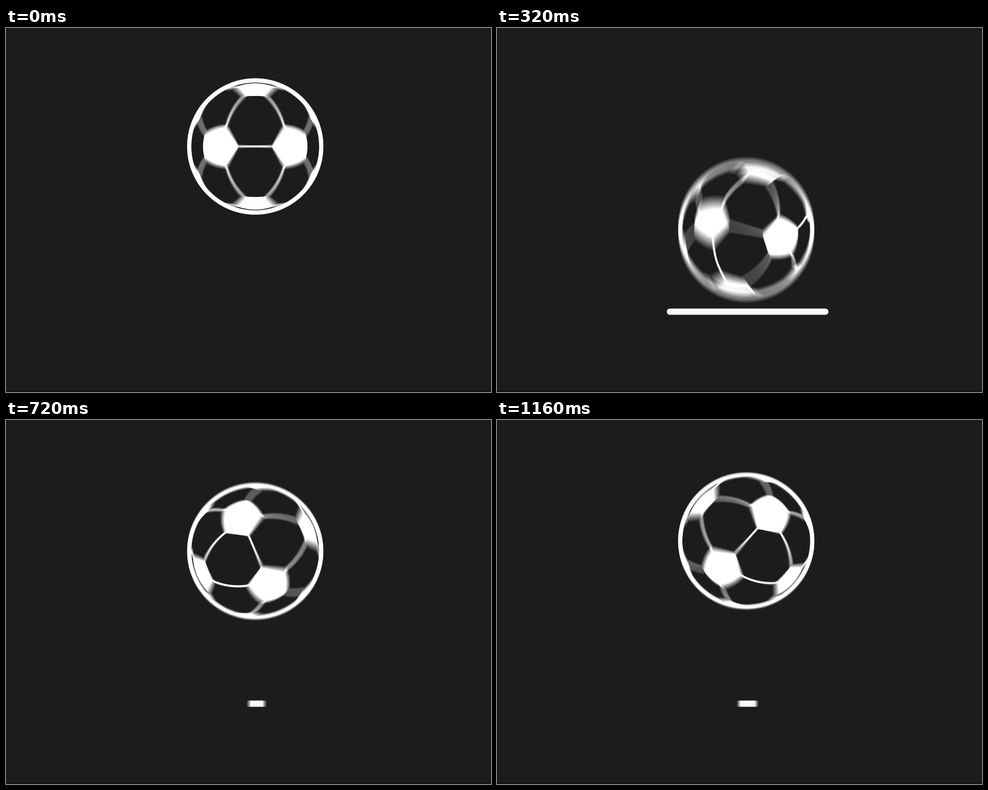
Write an HTML page with a canvas that moves like this. It is 864x648 px and loops after 1.2 s.

```html
<!DOCTYPE html>
<html>
<head>
<meta charset="utf-8">
<style>
  html, body { margin: 0; height: 100%; overflow: hidden; background: #1c1c1c; }
  canvas { display: block; }
</style>
</head>
<body>
<canvas id="stage" width="864" height="648"></canvas>
<script>
const LOOP = 1200, STEP = 40;
const SAMPLES = 17, SHUTTER = 8;      // motion blur: samples over degrees of spin
const INK = 223;                      // white minus background, added as light
const CX = 444, TOP = 210.5, IMPACT = 180;

const ctx = document.getElementById('stage').getContext('2d');
const clamp = (v, lo, hi) => Math.max(lo, Math.min(hi, v));

// Smooth curve through [x, y] points.
function curve(pts) {
  const n = pts.length - 1;
  const h = i => pts[i + 1][0] - pts[i][0];
  const sec = i => (pts[i + 1][1] - pts[i][1]) / h(i);
  const m = [];
  for (let i = 1; i < n; i++)
    m[i] = (sec(i - 1) * h(i) + sec(i) * h(i - 1)) / (h(i - 1) + h(i));
  m[0] = 2 * sec(0) - m[1];
  m[n] = 2 * sec(n - 1) - m[n - 1];
  return x => {
    x = clamp(x, pts[0][0], pts[n][0]);
    let i = 0;
    while (i < n - 1 && x > pts[i + 1][0]) i++;
    const d = h(i), u = (x - pts[i][0]) / d, v = 1 - u;
    return v * v * ((1 + 2 * u) * pts[i][1] + u * d * m[i])
         + u * u * ((1 + 2 * v) * pts[i + 1][1] - v * d * m[i + 1]);
  };
}

// Height lost and bar width, both over one turn of the ball.
const fall = curve([[0, 0], [67, 23], [90, 36.5], [IMPACT, 165]]);
const rise = curve([[IMPACT, 165], [193, 148.5], [216, 123.5], [312, 4.5], [331, 3.5], [360, 0]]);
const barWidth = curve([[40, 0], [67, 28], [90, 88], [125, 215], [160, 288], [200, 288],
                        [216, 283], [265, 160], [312, 32], [331, 8], [345, 0]]);
const phase = a => (a % 360 + 360) % 360;
const drop = a => (a = phase(a)) < IMPACT ? fall(a) : rise(a);

// Degrees turned at a given time.
const turns = [[0, 0], [160, 90], [320, 193], [560, 331], [720, 427], [1000, 576], [1160, 672], [1200, 696]];
function spin(t) {
  const i = turns.findIndex(k => k[0] > t);
  const [t0, a0] = turns[i - 1], [t1, a1] = turns[i];
  return a0 + (a1 - a0) * (t - t0) / (t1 - t0);
}

function makeBall() {
  const c = document.createElement('canvas');
  c.width = c.height = 512;
  const g = c.getContext('2d');
  g.translate(256, 256);
  g.scale(2, 2);
  g.fillStyle = g.strokeStyle = `rgb(${INK},${INK},${INK})`;
  g.lineJoin = g.lineCap = 'round';
  g.lineWidth = 7.6;
  g.beginPath();
  g.arc(0, 0, 117.6, 0, 7);
  g.stroke();
  g.lineWidth = 3.6;
  g.stroke(new Path2D('M-29 0H29'));
  g.beginPath();
  g.arc(0, 0, 118, 0, 7);
  g.clip();

  const sidePentagon = new Path2D('M-29 0L-51 -37Q-72 -36 -89 -24Q-97 0 -89 24Q-72 36 -51 37Z');
  const topPentagon = new Path2D('M-21 -89Q0 -91 21 -89L37 -105Q0 -120 -37 -105Z');
  const rimWedge = new Path2D('M-99 -47Q-103 -40 -109 -36L-116 -42L-92 -80L-85 -77Q-95 -62 -99 -47Z');
  const seams = new Path2D('M-51 -37Q-43 -67 -21 -89M-89 -24Q-96 -34 -99 -47M-37 -105L-47 -104');
  for (const sx of [1, -1]) for (const sy of [1, -1]) {
    g.save();
    g.scale(sx, sy);
    g.fill(sidePentagon);
    g.fill(topPentagon);
    g.fill(rimWedge);
    g.stroke(seams);
    g.restore();
  }
  return c;
}
const ball = makeBall();

function drawBall(y, angle) {
  ctx.save();
  ctx.translate(CX, y);
  ctx.rotate(angle * Math.PI / 180);
  ctx.drawImage(ball, -128, -128, 256, 256);
  ctx.restore();
}

function drawBar(w) {
  if (w <= 0) return;
  ctx.save();
  ctx.translate(446.5, 505);
  ctx.scale(w / 288, 1);
  ctx.beginPath();
  ctx.roundRect(-144, -5.5, 288, 11, 5.5);
  ctx.fill();
  ctx.restore();
}

function draw(t) {
  ctx.globalCompositeOperation = 'source-over';
  ctx.globalAlpha = 1;
  ctx.fillStyle = '#1c1c1c';
  ctx.fillRect(0, 0, 864, 648);
  ctx.fillStyle = '#161216';
  ctx.fillRect(0, 645, 864, 3);

  ctx.globalCompositeOperation = 'lighter';
  ctx.globalAlpha = 1 / SAMPLES;
  ctx.fillStyle = `rgb(${INK},${INK},${INK})`;
  const angle = spin(t), mid = drop(angle);
  const smear = phase(angle) > IMPACT ? 1.9 : 1.1;
  for (let i = 0; i < SAMPLES; i++) {
    const a = angle + SHUTTER * (i / (SAMPLES - 1) - 0.5);
    drawBall(TOP + mid + smear * (drop(a) - mid), a);
    drawBar(clamp(barWidth(phase(a)), 0, 288));
  }
}

function tick(now) {
  draw(Math.floor(now % LOOP / STEP) * STEP);
  requestAnimationFrame(tick);
}
draw(0);
requestAnimationFrame(tick);
</script>
</body>
</html>
```
